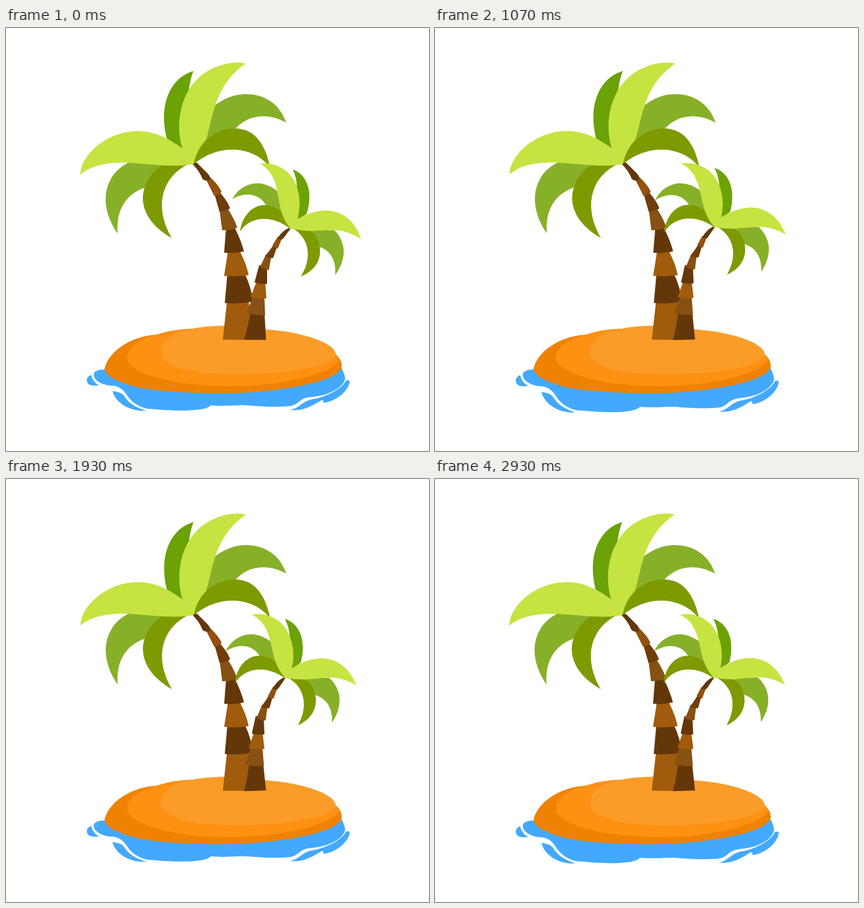
These frames come from a looping animation (640x640 px, 3000 ms). An HTML page with a canvas:

```html
<!DOCTYPE html>
<html lang="en">
<head>
<meta charset="utf-8">
<title>Palm island</title>
<style>
  html, body { margin: 0; width: 100%; height: 100%; overflow: hidden; background: #fff; }
  canvas { display: block; width: 100vw; height: 100vh; }
</style>
</head>
<body>
<canvas id="stage"></canvas>
<script>
const SIZE = 640, LOOP = 3000, STEP = LOOP / 42;
const canvas = document.getElementById('stage');
const ctx = canvas.getContext('2d');

const LIGHT = '#c5e441', MID = '#87b029', OLIVE = '#7e9a01', DEEP = '#6ba205';
const BARK = '#643709', RUST = '#a05c0c', UMBER = '#875113', COCOA = '#6f3c0a', COPPER = '#935010';
const BLUE = '#43a9fe';

const shape = (color, d) => ({ color, path: new Path2D(d + 'Z') });

const water = [
  shape(BLUE, 'M150 517C140 516 131 520 133 526C134 534 146 540 158 541C172 541 178 548 184 557C190 566 200 573 214 576C240 578 260 580 285 578C300 577 307 574 310 571C340 573 345 570 365 571C390 573 410 574 430 572C442 570 443 562 456 559C475 557 485 555 496 549C506 544 512 537 513 531C513 525 510 520 508 515'),
  shape(BLUE, 'M129 525C122 527 120 534 125 539C130 542 136 541 141 541C134 537 130 531 129 525'),
  shape(BLUE, 'M161 549C165 567 188 581 212 579C196 574 186 568 179 557C175 551 168 551 161 549'),
  shape(BLUE, 'M430 578C444 575 448 565 462 562C482 559 508 547 514 534C517 532 520 533 520 535C519 548 500 565 481 567C479 565 481 563 478 563C463 571 452 580 430 578')
];

const sand = [
  shape('#ef8201', 'M149 516C154 492 184 467 228 464C250 457 265 456 282 455L499 494C506 500 508 506 508 512C506 529 456 544 378 550.5C340 554.5 245 553 200 544C166 535 150 526 149 516'),
  shape('#fe9012', 'M228 464C200 471 183 484 183 499C184 522 252 542 340 542C420 542 496 522 504 502L498 492L282 455C265 456 250 457 228 464'),
  shape('#fb9c29', 'M282 455C254 459 234 473 234 491C235 512 280 524 345 524C390 524 430 521 444 516C468 514 499 505 499 493C497 476 446 459 392 456C360 449 310 449 282 455')
];

const tallPalm = [
  // trunk, bottom to top, each piece tucked under the next
  shape(RUST, 'M334.5 412L367 412L375 472L328 471.5'),
  shape(BARK, 'M335 371L361 371Q371 392 374 414Q352 418 331 416'),
  shape(RUST, 'M336 336L353 336C360 350 365 362 367 374Q349 377 330 375'),
  shape(BARK, 'M333 302L345 300C352 314 357 326 360 338C350 340 340 341 330 340'),
  shape(UMBER, 'M323 274L334 271C342 283 347 294 350 302C342 305 335 306 327 306'),
  shape(COCOA, 'M315 250L322 247C331 257 337 266 339 273C334 276 328 277 323 278'),
  shape(COPPER, 'M302 228L308 225C318 234 324 242 326 248C323 252 319 253 315 254'),
  shape(BARK, 'M281 205C285 203 289 203 291 206L306 221C309 225 310 228 308 230C304 232 300 231 297 228C295 222 290 213 281 205'),
  // fronds
  shape(MID, 'M424 143C414 114 390 99 360 100C342 101 328 108 316 117L300 172L345 155C360 136 388 124 424 143'),
  shape(MID, 'M169 311C150 284 144 252 160 226C166 216 176 208 187 203L245 205L209 242C180 252 166 278 169 311'),
  shape(DEEP, 'M283.5 65C254 74 239 102 239 136C239 148 241 158 243 167L268 184L276 100C277 87 280 74 283.5 65'),
  shape(OLIVE, 'M251 318C224 303 207 281 207 257C208 236 220 217 237 207L276 206C236 225 223 270 251 318'),
  shape(LIGHT, 'M362.5 54C352 50 325 52 302 67C276 84 262 115 262 150C262 162 264 173 267 182L283 206C291 196 298 184 303 168C313 140 313 88 362.5 54'),
  shape(LIGHT, 'M112.5 222C113 192 152 156 200 156C228 156 250 170 267 182L284 206C255 211 230 207 187 204C160 203 130 206 112.5 222'),
  shape(OLIVE, 'M284 206C290 174 315 152 346 152C378 152 393 178 400 212C378 180 325 172 284 206')
];

const smallPalm = [
  shape(BARK, 'M370 430L391 430L393.5 472L360 471.5Q366 453 370 430'),
  shape(UMBER, 'M374 404L391 404L392 435Q377 435 364 431Q369 419 374 404'),
  shape(RUST, 'M380 382L392 382L394 409Q381 410 370 407Q374 396 380 382'),
  shape(BARK, 'M383 359L395 360L395 387Q385 388 376 385Q379 374 383 359'),
  shape(UMBER, 'M393 343L402 344Q399 357 398 366Q390 366 384 362Q388 354 393 343'),
  shape(COCOA, 'M405 328L410 330Q407 341 404 348Q397 348 392 345Q399 337 405 328'),
  shape(COPPER, 'M411 316L418 318C414 326 413 330 411 334Q406 332 403 329'),
  shape(BARK, 'M431 303L427 303C420 306 414 313 411 318C413 320 416 321 419 319'),
  shape(MID, 'M342 259C352 241 368 234 383 235C394 236 403 241 411 247L418 280L394 270C386 252 364 246 342 259'),
  shape(MID, 'M498 374C514 352 517 327 497 306L462 305L474 331C492 337 500 353 498 374'),
  shape(DEEP, 'M434 214C451 220 460 238 459 257C459 266 457 274 455 281L440 292L440 240C440 230 437 221 434 214'),
  shape(OLIVE, 'M354 308C357 285 372 268 391 268C408 268 424 280 430 304C405 283 370 283 354 308'),
  shape(OLIVE, 'M446 376C466 368 476 353 475 336C475 324 469 314 462 307L434 303C459 318 464 348 446 376'),
  shape(LIGHT, 'M384 205.5C402 202 425 211 436 231C446 250 446 272 441 289L432 304C420 294 415 275 412 256C409 234 402 214 384 205.5'),
  shape(LIGHT, 'M537 319C530 296 512 277 485 276C470 276 455 281 441 289L429 303C450 308 465 307 485 306C500 304 520 308 537 319')
];

// Keys are [time, value] pairs, eased in and out of each key.
function ease(keys, t) {
  const i = Math.max(1, keys.findIndex(k => t <= k[0]));
  const [t0, a] = keys[i - 1], [t1, b] = keys[i];
  const u = (t - t0) / (t1 - t0);
  return a + (b - a) * u * u * (3 - 2 * u);
}

const tallSway = [[0, 0], [590, -0.93], [1490, 0.93], [2390, -0.93], [LOOP, 0]];
const smallSway = [[0, 0], [590, -5.5], [1490, 0], [2390, -5.5], [LOOP, -2.75]];
const swell = [[0, 1], [1000, 1.04], [2000, 1], [LOOP, 1.04]];

function paint(shapes) {
  for (const s of shapes) {
    ctx.fillStyle = s.color;
    ctx.fill(s.path);
  }
}

function paintAt(shapes, x, y, degrees, scaleY = 1) {
  ctx.save();
  ctx.translate(x, y);
  ctx.rotate(degrees * Math.PI / 180);
  ctx.scale(1, scaleY);
  ctx.translate(-x, -y);
  paint(shapes);
  ctx.restore();
}

function draw(t) {
  const w = Math.round(innerWidth * devicePixelRatio);
  const h = Math.round(innerHeight * devicePixelRatio);
  if (canvas.width !== w || canvas.height !== h) {
    canvas.width = w;
    canvas.height = h;
  }
  ctx.setTransform(w / SIZE, 0, 0, h / SIZE, 0, 0);
  ctx.fillStyle = '#fff';
  ctx.fillRect(0, 0, SIZE, SIZE);
  paintAt(water, 320, 517, 0, ease(swell, t));
  paint(sand);
  paintAt(tallPalm, 345, 472, ease(tallSway, t));
  paintAt(smallPalm, 377, 472, ease(smallSway, t));
}

const start = performance.now();
function tick() {
  const t = Math.max(0, performance.now() - start) % LOOP;
  // The motion advances in 42 even steps per loop.
  draw(Math.min(41, Math.floor((t + 3) / STEP)) * STEP);
  requestAnimationFrame(tick);
}
tick();
</script>
</body>
</html>
```
